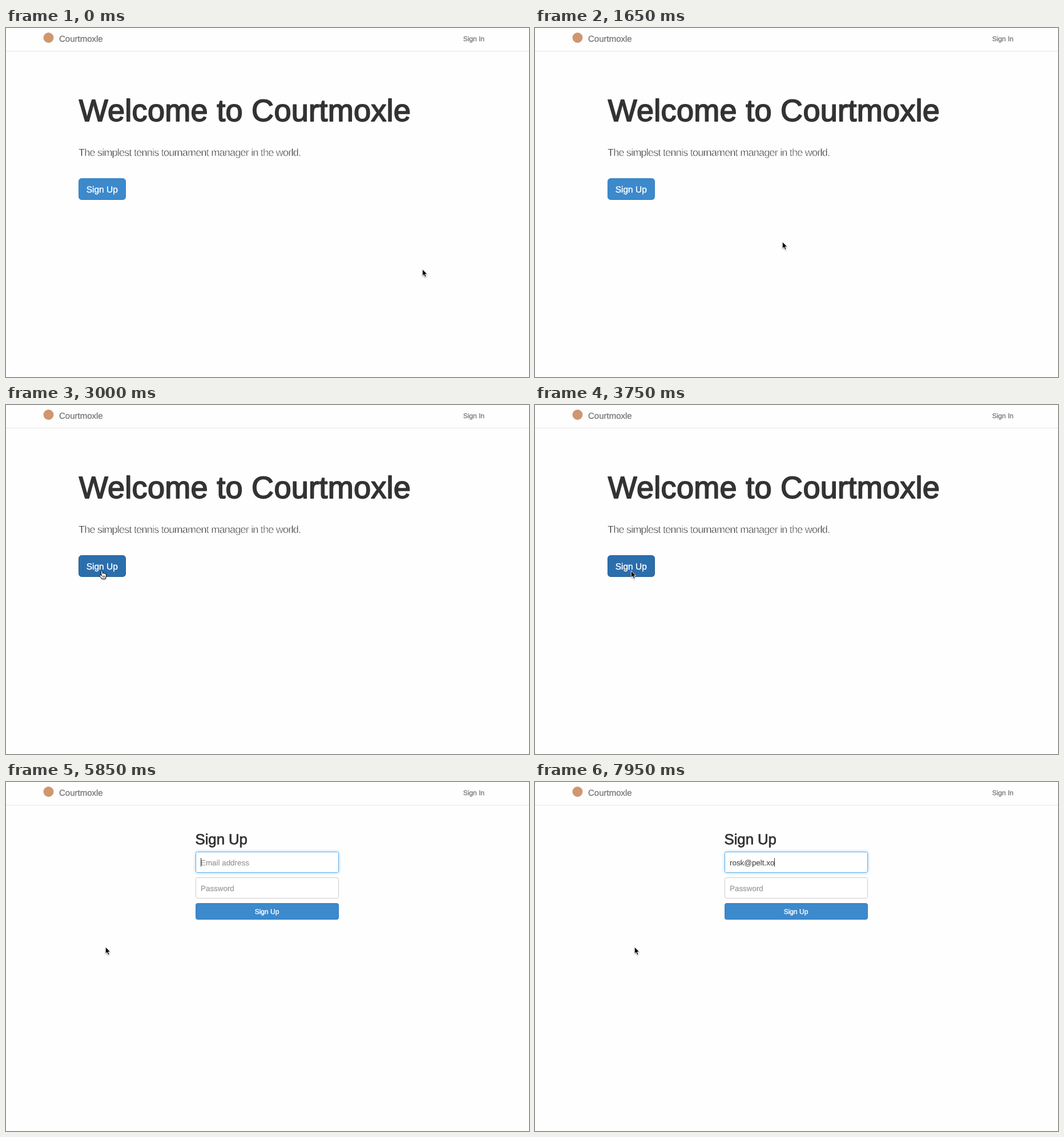
An HTML page for the animation above (8 s loop, 916 by 611 pixels).

```html
<!DOCTYPE html>
<html lang="en">
<head>
<meta charset="utf-8">
<title>Sign up demo</title>
<style>
  html, body { margin: 0; width: 100%; height: 100%; overflow: hidden; background: #fefefe; }
  svg { display: block; width: 916px; height: 611px; font-family: "Liberation Sans", Arial, sans-serif; }
  text { text-rendering: geometricPrecision; }
  .nav { fill: #777; stroke: #777; stroke-width: .3px; }
  .head { fill: #333; stroke: #333; stroke-linejoin: round; }
  .lead { fill: #222; font-size: 18px; letter-spacing: -.77px; stroke: #fefefe; stroke-width: .6px; }
  .btn { fill: #3c89cc; stroke: #3780c2; }
  .btn.hover { fill: #2b6eac; stroke: #285e8e; }
  .label { fill: #fff; stroke: #fff; stroke-width: .4px; }
  .field { fill: #fff; stroke: #ccc; }
  .focus { stroke: #5fb1ee; filter: drop-shadow(0 0 2.5px rgba(102, 175, 233, .65)); }
  .input { font-size: 13.4px; fill: #999; stroke: #999; stroke-width: .2px; }
  .typed { fill: #555; stroke: #555; }
  #mouse { filter: drop-shadow(0 1px 1px rgba(0, 0, 0, .35)); }
</style>
</head>
<body>
<svg viewBox="0 0 916 611">
  <rect width="916" height="611" fill="#fefefe"/>
  <rect y="40" width="916" height="1" fill="#e7e7e7"/>
  <circle cx="74.5" cy="17" r="9" fill="#cf9670"/>
  <text class="nav" x="93" y="24.3" font-size="15">Courtmoxle</text>
  <text class="nav" x="800.7" y="23.3" font-size="12">Sign In</text>

  <g id="home">
    <text class="head" x="127.7" y="163" font-size="54" letter-spacing=".3" stroke-width="1.8">Welcome to Courtmoxle</text>
    <text class="lead" x="127" y="224">The simplest tennis tournament manager in the world.</text>
    <rect id="join" class="btn" x="127.5" y="263.5" width="82" height="37" rx="5"/>
    <text class="label" x="140.7" y="288" font-size="15.5">Sign Up</text>
  </g>

  <g id="form">
    <text class="head" x="331.5" y="109" font-size="25.7" stroke-width=".8">Sign Up</text>
    <rect class="field focus" x="332.5" y="122.5" width="250" height="36" rx="3"/>
    <text id="email" class="input" x="341" y="145.5"></text>
    <rect id="caret" x="341" y="133" width="1" height="15" fill="#333"/>
    <rect class="field" x="332.5" y="167.5" width="250" height="36" rx="3"/>
    <text class="input" x="341" y="190.5">Password</text>
    <rect class="btn" x="332.5" y="212.5" width="250" height="28" rx="3"/>
    <text class="label" x="457" y="231" font-size="12" text-anchor="middle">Sign Up</text>
  </g>

  <g id="mouse">
    <path id="arrow" d="M.3 .3V12.2L3 9.7L5 14.2L7.1 13.3L5.1 8.9H8.8Z" fill="#000" stroke="#fff" stroke-width=".9"/>
    <g id="hand" stroke="#000" stroke-linejoin="round" stroke-linecap="round">
      <path d="M-1.8 1.2Q-1.7 0 -.6 0Q.5 0 .8 1.2L1.4 5Q2 3.9 3.3 4.4L3.9 5.1Q5 4.4 5.8 5.6Q7.3 5.2 7.5 6.8V9.6L6.2 14.3H-.1Q-1.6 11.4 -4 9.4Q-4.9 8.1 -3.9 7.5Q-2.6 7.2 -1 8.7Z" fill="#fff"/>
      <path d="M1.4 9V12M3.2 9V12M5 9V12" fill="none" stroke-width=".7"/>
    </g>
  </g>
</svg>
<script>
const LOOP = 8000, STEP = 150, EMAIL = "rosk@pelt.xo";
const $ = id => document.getElementById(id);
const [home, form, join, email, caret, mouse, arrow, hand] =
  ["home", "form", "join", "email", "caret", "mouse", "arrow", "hand"].map($);

// [time, x, y]
const moves = [
  [0, 729, 422],
  [2100, 374, 356], [2250, 248, 316], [2400, 187, 297], [2550, 174, 292],
  [2700, 169, 290], [3000, 168, 290], [4350, 174, 288.5]
];
// [time, characters typed]
const typing = [
  [0, 0], [6300, 1], [6450, 2], [6600, 3], [6750, 4], [7050, 5],
  [7350, 6], [7500, 7], [7650, 9], [7800, 10], [7950, 12]
];
// [time, caret shown]
const blinks = [[0, 1], [4350, 0], [4800, 1], [5400, 0], [5850, 1]];

const at = (table, t) => table.findLast(row => row[0] <= t);
const show = (el, on) => el.style.display = on ? "" : "none";

function pointer(t) {
  if (t < 900 || t >= 2100) return at(moves, t).slice(1);
  const k = Math.min(1, (Math.floor((t - 900) / STEP) + 1) / 6);
  const e = k * k * (3 - 2 * k);
  return [Math.round(729 - 296 * e), Math.round(422 - 48 * e)];
}

function draw(t) {
  const signup = t >= 3900;
  show(home, !signup);
  show(form, signup);
  join.classList.toggle("hover", t >= 2400);

  const onLink = t >= 2400 && t < 3150;
  mouse.setAttribute("transform", `translate(${pointer(t)})`);
  show(hand, onLink);
  show(arrow, !onLink);

  const count = at(typing, t)[1];
  email.textContent = count ? EMAIL.slice(0, count) : "Email address";
  email.classList.toggle("typed", count > 0);
  const end = count && signup ? email.getComputedTextLength() : 0;
  caret.setAttribute("x", Math.round(341 + end));
  show(caret, at(blinks, t)[1]);
}

const start = performance.now();
function tick() {
  draw((performance.now() - start) % LOOP);
  requestAnimationFrame(tick);
}
tick();
</script>
</body>
</html>
```
